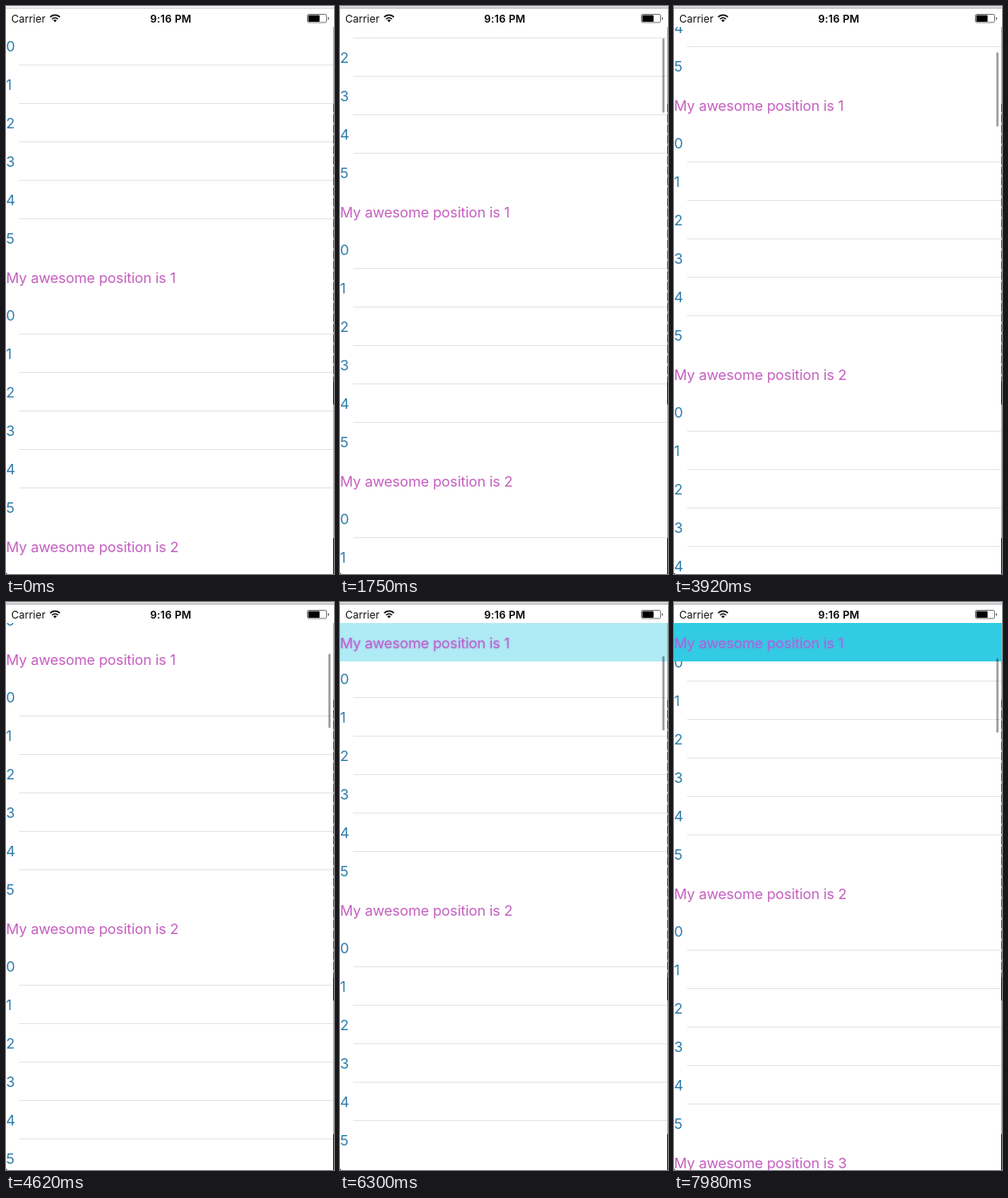
An HTML page that plays this animation: 376x650 px, repeating every 8 s.

```html
<!DOCTYPE html>
<html lang="en">
<head>
<meta charset="utf-8">
<title>Sticky section headers</title>
<style>
  html, body { margin: 0; width: 100%; height: 100%; overflow: hidden; background: #fff; }
  svg { display: block; width: 376px; height: 650px; font-family: Inter, "Liberation Sans", sans-serif; }
  .item { font-size: 16.5px; letter-spacing: -.17px; fill: #2f7dab; }
  .head { fill: #c45fbf; }
  .bar { font-size: 12px; fill: #111; }
  .clock { font-weight: 600; letter-spacing: .2px; fill: #000; }
</style>
</head>
<body>
<svg id="stage" viewBox="0 0 376 650">
  <defs>
    <clipPath id="view"><rect y="24" width="376" height="626"/></clipPath>
  </defs>
  <rect width="376" height="650" fill="#fff"/>
  <g clip-path="url(#view)">
    <g id="list"></g>
    <g id="sticky">
      <rect id="tint" y="24" width="376" height="44"/>
      <text id="title" class="item head" x="0" y="52.5">My awesome position is 1</text>
    </g>
    <rect id="thumb" x="369.5" width="2.5" height="85" rx="1.25" fill="#000"/>
  </g>
  <rect id="chrome" width="376" height="3"/>
  <rect id="edge" y="2" width="376" height="1"/>
  <text class="bar" x="6" y="18.5">Carrier</text>
  <g fill="none" stroke="#111" stroke-width="1.6">
    <path d="M50.6 12.6a8.2 8.2 0 0 1 11.2 0"/>
    <path d="M52.8 15a5 5 0 0 1 6.8 0"/>
  </g>
  <path d="M56.2 18.6l-2-2.1a2.9 2.9 0 0 1 4 0z" fill="#111"/>
  <text class="bar clock" x="188.9" y="18.5" text-anchor="middle">9:16 PM</text>
  <rect x="345.5" y="9.5" width="22" height="9.4" rx="1.6" fill="#fff" stroke="#777"/>
  <rect x="346.5" y="10.5" width="13" height="7.4" rx=".6" fill="#000"/>
  <path d="M369 12.4v3.6q1.2-.5 1.2-1.8t-1.2-1.8z" fill="#555"/>
  <g fill="#222">
    <rect x="375" y="24" width="1" height="626" fill="#aaa"/>
    <path d="M375.5 112V430" stroke="#555" stroke-dasharray="9 3"/>
    <rect x="375" y="430" width="1" height="26"/>
    <rect x="375" y="609" width="1" height="41"/>
    <path d="M0 648.5L1.5 650H0z"/>
  </g>
</svg>
<script>
const LOOP = 8000, STEP = 70, TOP = 24, ROW = 44, ITEMS = 6, SECTION = ROW * (ITEMS + 1);
const STICK = ROW * ITEMS;
const $ = id => document.getElementById(id);

// Finger drag: [time, scroll offset]
const drag = [
  [0, 0], [630, 0], [1750, 75], [2380, 134], [2730, 142], [3080, 142], [3150, 143],
  [4620, 245], [5670, 260], [6300, 266], [6720, 270], [6790, 270], [7980, 285]
];

function add(parent, tag, attrs, text) {
  const el = document.createElementNS("http://www.w3.org/2000/svg", tag);
  for (const key in attrs) el.setAttribute(key, attrs[key]);
  if (text !== undefined) el.textContent = text;
  parent.appendChild(el);
  return el;
}

const headers = [];
for (let s = 0; s < 3; s++) {
  const y0 = TOP + s * SECTION;
  for (let i = 0; i < ITEMS; i++) {
    const y = y0 + i * ROW;
    add($("list"), "text", { class: "item", x: 0, y: y + 28 }, i);
    if (i < ITEMS - 1) add($("list"), "rect", { x: 15, y: y + 43, width: 361, height: 1, fill: "#e5e5e7" });
  }
  headers.push(add($("list"), "text", { class: "item head", x: 0, y: y0 + STICK + 28.5 }, "My awesome position is " + (s + 1)));
}

const clamp = v => Math.max(0, Math.min(1, v));
const smooth = v => v * v * (3 - 2 * v);
const slope = i => (drag[i + 1][1] - drag[i][1]) / (drag[i + 1][0] - drag[i][0]);

// Harmonic mean of neighbouring slopes keeps the curve monotone
function tangent(i) {
  if (i === 0 || i === drag.length - 1) return slope(Math.max(0, i - 1));
  const a = slope(i - 1), b = slope(i);
  return a * b > 0 ? 2 * a * b / (a + b) : 0;
}

function offsetAt(t) {
  let i = 0;
  while (i < drag.length - 2 && t >= drag[i + 1][0]) i++;
  const [t0, y0] = drag[i], [t1, y1] = drag[i + 1];
  const span = t1 - t0, u = clamp((t - t0) / span), v = 1 - u;
  const y = y0 + (y1 - y0) * smooth(u) + span * u * v * (v * tangent(i) - u * tangent(i + 1));
  return Math.round(y);
}

function mix(a, b, k) {
  return "rgb(" + a.map((v, i) => Math.round(v + (b[i] - v) * k)) + ")";
}

function render(time) {
  const t = Math.floor(time % LOOP / STEP) * STEP;
  const offset = offsetAt(t), stuck = offset >= STICK;
  const k = smooth(clamp((t - 6150) / 350));
  $("list").setAttribute("transform", `translate(0 ${-offset})`);
  headers[0].style.display = stuck ? "none" : "";
  $("sticky").style.display = stuck ? "" : "none";
  $("tint").setAttribute("fill", mix([255, 255, 255], [49, 203, 227], k));
  $("title").style.fill = mix([196, 95, 191], [162, 103, 222], k);
  $("title").style.filter = k > 0 ? "drop-shadow(0 0 1px rgba(190,120,225,.6))" : "none";
  $("thumb").setAttribute("y", 27.2 + offset * .131);
  $("thumb").setAttribute("opacity", .38 * clamp((t - 630) / 210));
  const active = t >= 700;
  $("chrome").setAttribute("fill", active ? "#d9d9d9" : "#f4f4f4");
  $("edge").setAttribute("fill", active ? "#b4b4b4" : "#d2d2d2");
}

const start = performance.now();
function tick() {
  render(performance.now() - start);
  requestAnimationFrame(tick);
}
tick();
</script>
</body>
</html>
```
